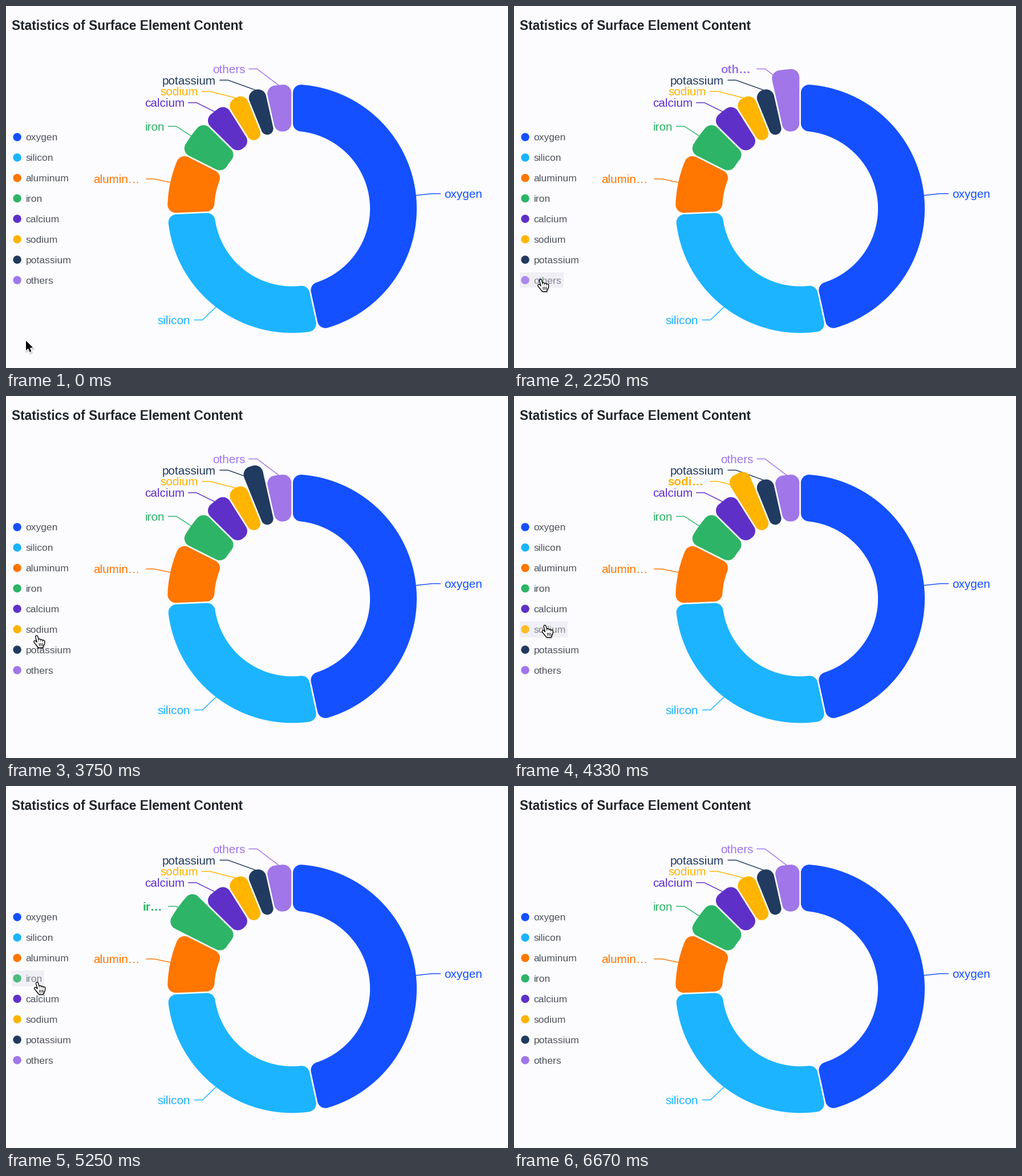
A matplotlib script for the animation above (8660 ms loop, 880x636 px).

```python
import numpy as np
import matplotlib.pyplot as plt
from matplotlib.animation import FuncAnimation
from matplotlib.collections import LineCollection
from matplotlib.patches import Circle, Polygon, Rectangle
from matplotlib.transforms import Affine2D

W, H, DPI = 880, 636, 100
LOOP_MS, FRAMES = 8660, 104
FRAME_MS = LOOP_MS / FRAMES
PX = 72 / DPI
BG = "#fcfcff"

# ring: radii are shares of one base radius
CX, CY, BASE = 501.6, 356, 273
R_IN, R_OUT, R_HOVER = 0.5 * BASE, 0.8 * BASE, 0.9 * BASE
CORNER, HALF_GAP = 14.3, 1.35
HOVER_MS = 300

# leaders bend on an ellipse around the ring
ELBOW_RX, ELBOW_RY = 247, 253.5
LINE_STEP, LEADER_RUN, LABEL_GAP, LABEL_LEFT = 19.8, 14, 7, 155

SLICES = [  # name, percent, colour
    ("oxygen", 46.60, "#1450ff"),
    ("silicon", 27.72, "#1cb4ff"),
    ("aluminum", 8.13, "#ff7600"),
    ("iron", 5.00, "#2eb467"),
    ("calcium", 3.63, "#5f30c8"),
    ("sodium", 2.83, "#ffb400"),
    ("potassium", 2.59, "#213a5f"),
    ("others", 3.50, "#a076e8"),
]

START = (35, 588)
MOVES = [  # departure ms, arrival ms, x, y, legend row pointed at
    (250, 900, 66, 481, None),
    (1090, 1245, 56.5, 484, None),
    (1790, 2245, 46.5, 479.5, "others"),
    (2790, 3330, 53, 447, "potassium"),
    (3625, 4080, 54, 403, "sodium"),
    (4325, 4825, 56.5, 371.5, "calcium"),
    (4830, 5160, 54.5, 344, "iron"),
    (6200, 6660, 56, 670, None),
]
LEAVE, ENTER = 0.25, 0.4  # parts of a move at which rows lose and gain the hover


def hover_spans():
    spans = {}
    for move, after in zip(MOVES, MOVES[1:]):
        t0, t1, row = move[0], move[1], move[4]
        if row:
            spans[row] = (t0 + ENTER * (t1 - t0),
                          after[0] + LEAVE * (after[1] - after[0]))
    return spans


SPANS = hover_spans()
HAND_ON = min(enter for enter, _ in SPANS.values())
HAND_OFF = max(leave for _, leave in SPANS.values())
NEVER = (np.inf, np.inf)


def ease_out(t):
    return 1 - (1 - np.clip(t, 0, 1)) ** 3


def cursor_at(ms):
    pos = np.array(START, float)
    for t0, t1, x, y, _ in MOVES:
        pos += (np.array([x, y]) - pos) * ease_out((ms - t0) / (t1 - t0))
    return pos


def growth(name, ms):
    enter, leave = SPANS.get(name, NEVER)
    return ease_out((ms - enter) / HOVER_MS) - ease_out((ms - leave) / HOVER_MS)


def arc(cx, cy, r, start, end, n):
    a = np.linspace(start, end, n)
    return np.column_stack([cx + r * np.cos(a), cy + r * np.sin(a)])


def slice_points(a0, a1, r_out):
    """Ring slice with rounded corners and a gap of even width."""
    s = np.sin((a1 - a0) / 2)
    c_out = min(CORNER, (r_out * s - HALF_GAP) / (1 + s))
    c_in = min(CORNER, (R_IN * s - HALF_GAP) / (1 - s))
    d_out, d_in = r_out - c_out, R_IN + c_in
    turn_out = np.arcsin((HALF_GAP + c_out) / d_out)
    turn_in = np.arcsin((HALF_GAP + c_in) / d_in)
    b0, b1 = a0 + turn_out, a1 - turn_out
    e0, e1 = a0 + turn_in, a1 - turn_in
    quarter = np.pi / 2

    def corner(dist, angle, r, start, end):
        x, y = CX + dist * np.cos(angle), CY + dist * np.sin(angle)
        return arc(x, y, r, start, end, 14)

    return np.vstack([
        corner(d_out, b0, c_out, a0 - quarter, b0),
        arc(CX, CY, r_out, b0, b1, 90),
        corner(d_out, b1, c_out, b1, a1 + quarter),
        corner(d_in, e1, c_in, a1 + quarter, e1 + np.pi),
        arc(CX, CY, R_IN, e1, e0, 90),
        corner(d_in, e0, c_in, e0 + np.pi, a0 + 3 * quarter),
    ])


fig = plt.figure(figsize=(W / DPI, H / DPI), dpi=DPI, facecolor=BG)
ax = fig.add_axes([0, 0, 1, 1])
ax.set_xlim(0, W)
ax.set_ylim(H, 0)
ax.axis("off")


def write(x, y, text, size, color, **kw):
    return ax.text(x, y, text, fontsize=size * PX, color=color,
                   family="Liberation Sans", va="baseline", **kw)


def width(label):
    return label.get_window_extent().width


def fit(label, text, room):
    """Shorten the text with an ellipsis until it fits the room."""
    label.set_text(text)
    keep = len(text)
    while width(label) > room and keep > 1:
        keep -= 1
        label.set_text(text[:keep] + "…")
    return label.get_text()


class Slice:
    def __init__(self, row, name, percent, color, a0):
        self.name, self.color = name, color
        self.a0, self.a1 = a0, a0 + percent / 100 * 2 * np.pi
        self.mid = (self.a0 + self.a1) / 2
        self.side = 1 if np.cos(self.mid) > 0 else -1
        self.label_y = CY + ELBOW_RX * np.sin(self.mid)
        self.wedge = ax.add_patch(Polygon(slice_points(self.a0, self.a1, R_OUT),
                                          fc=color, ec="none", zorder=2))

        y = 230.3 + 35.9 * row
        self.dot = ax.add_patch(Circle((19.6, y), 7.2, fc=color, ec="none", zorder=2))
        self.key = write(34.7, y + 6, name, 17.5, "#4f535b", zorder=2)
        self.back = ax.add_patch(Rectangle((10, y - 13.7), width(self.key) + 28, 27.5,
                                           fc="#efeff5", ec="none", zorder=1))

    def add_label(self):
        y = self.label_y
        reach = ELBOW_RX * np.sqrt(max(0, 1 - ((y - CY) / ELBOW_RY) ** 2))
        elbow = CX + self.side * reach
        end = elbow + self.side * LEADER_RUN
        self.edge = end + self.side * LABEL_GAP
        tip_x, tip_y = CX + R_OUT * np.cos(self.mid), CY + R_OUT * np.sin(self.mid)
        ax.plot([end, elbow, tip_x], [y, y, tip_y], color=self.color,
                lw=1.45 * PX, zorder=1)

        self.label = write(self.edge, y + 7.3, self.name, 20.6, self.color, zorder=3,
                           ha="left" if self.side > 0 else "right")
        room = self.edge - LABEL_LEFT if self.side < 0 else W - self.edge
        self.text = fit(self.label, self.name, room)
        room = width(self.label) + 2
        self.label.set_weight("bold")
        self.short = fit(self.label, self.name, room)

    def update(self, ms):
        r = R_OUT + (R_HOVER - R_OUT) * growth(self.name, ms)
        self.wedge.set_xy(slice_points(self.a0, self.a1, r))
        enter, leave = SPANS.get(self.name, NEVER)
        on = enter <= ms < leave
        text = self.short if on else self.text
        self.label.set_text(text)
        self.label.set_weight("bold" if on else "normal")
        self.label.set_x(self.edge - (4 if text.endswith("…") else 0))
        self.back.set_visible(on)
        self.dot.set_alpha(0.85 if on else 1)
        self.key.set_alpha(0.68 if on else 1)


write(9.5, 42, "Statistics of Surface Element Content", 22.7, "#1f232a", weight="bold")

slices = []
angle = -np.pi / 2
for i, spec in enumerate(SLICES):
    slices.append(Slice(i, *spec, angle))
    angle = slices[-1].a1

# Push labels on the left down until none overlap.
lowest = 0
for part in sorted((s for s in slices if s.side < 0), key=lambda s: s.label_y):
    part.label_y = lowest = max(part.label_y, lowest + LINE_STEP)
for part in slices:
    part.add_label()

# Cursors are drawn around their tip and moved by one shared transform.
tip = Affine2D()
to_screen = tip + ax.transData


def cursor_poly(points, z, **kw):
    patch = Polygon(points, transform=to_screen, zorder=z, joinstyle="round", **kw)
    return ax.add_patch(patch)


def cursor_lines(lines, thick, color, z):
    return ax.add_collection(LineCollection(lines, linewidths=thick * PX, colors=color,
                                            capstyle="round", transform=to_screen,
                                            zorder=z), autolim=False)


def shadow(points):
    return [cursor_poly(np.array(points) + (0.8, 1.8), 9, fc="black", ec="black",
                        lw=w * PX, alpha=0.07) for w in (1, 3, 5)]


ARROW = [(0, 0), (0, 17.2), (4, 13.6), (6.6, 20), (9.4, 18.8), (6.8, 12.6), (12.2, 12.2)]
arrow = shadow(ARROW) + [
    cursor_poly(ARROW, 10, fc="white", ec="white", lw=2.8 * PX),
    cursor_poly(ARROW, 11, fc="black", ec="none"),
]

PALM = [(2, 11), (12.3, 12), (12, 17), (10.5, 21.3), (3.5, 21.3), (-1, 15.5)]
INDEX, THUMB = [(0, 2.6), (3, 13)], [(-2.8, 11.6), (2, 17)]
KNUCKLES = [[(5.2 + 3.5 * i, 8.6 + 1.1 * i), (6 + 3 * i, 13 + i)] for i in range(3)]
CREASES = [[(4.6 + 2.7 * i, 14.2), (4.8 + 2.7 * i, 18.6)] for i in range(3)]
FINGERS = [INDEX, THUMB] + KNUCKLES
hand = shadow(PALM) + [
    cursor_lines(FINGERS, 5.4, "black", 10),
    cursor_poly(PALM, 10, fc="black", ec="black", lw=2.8 * PX),
    cursor_lines(FINGERS, 2.7, "white", 11),
    cursor_poly(PALM, 11, fc="white", ec="none"),
    cursor_lines(CREASES, 1.1, "black", 12),
]


def update(frame):
    ms = frame * FRAME_MS
    for part in slices:
        part.update(ms)
    tip.clear().translate(*cursor_at(ms))
    pointing = HAND_ON <= ms < HAND_OFF
    for part in arrow:
        part.set_visible(not pointing)
    for part in hand:
        part.set_visible(pointing)
    return []


anim = FuncAnimation(fig, update, frames=FRAMES, interval=FRAME_MS,
                     init_func=lambda: update(0), repeat=True, repeat_delay=0)
plt.show()
```
